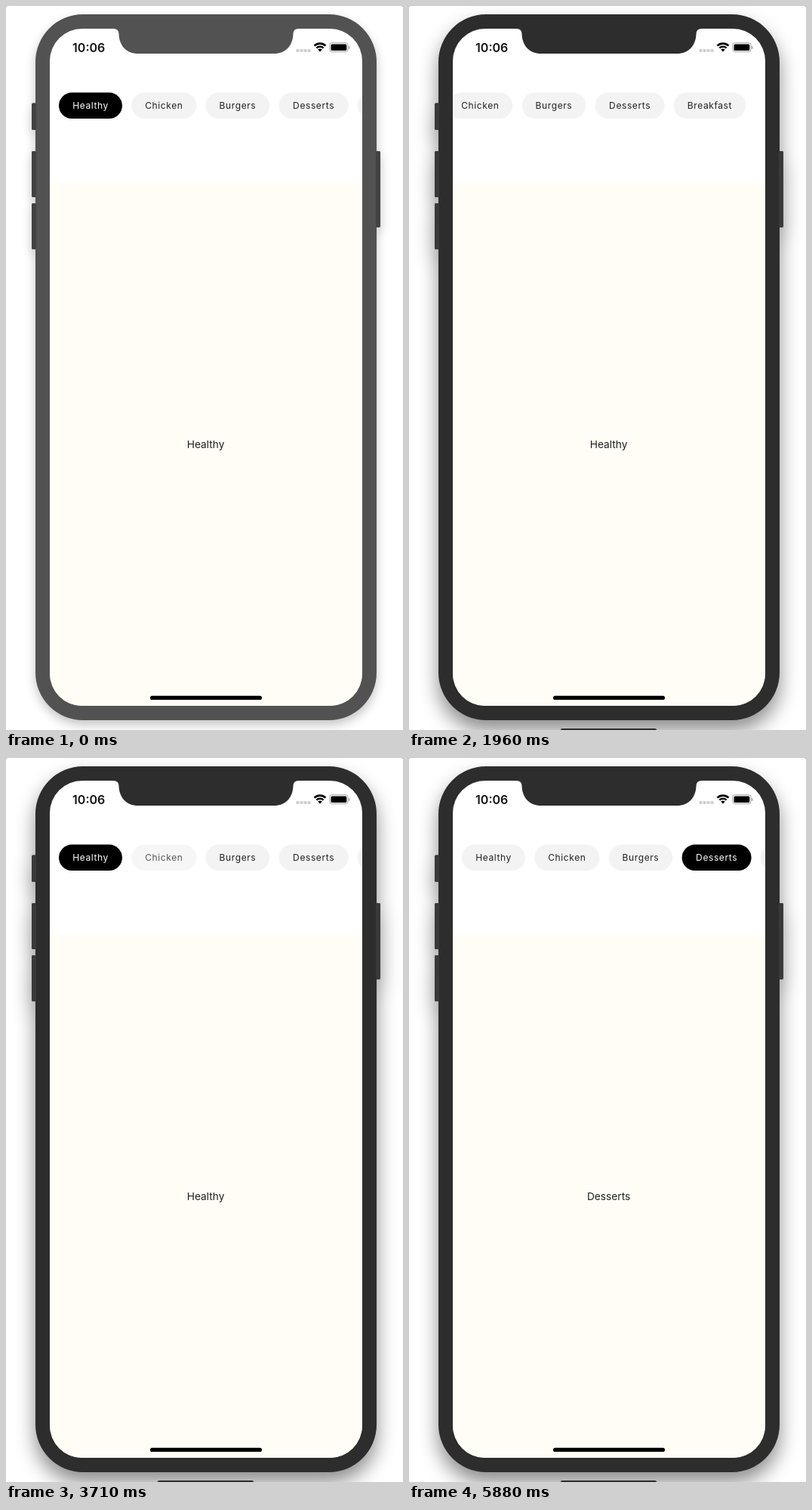
Animation of 526 by 958 pixels, one loop 6.65 s. Source, as an HTML page with a canvas:

```html
<!DOCTYPE html>
<html lang="en">
<head>
<meta charset="utf-8">
<title>Category tabs</title>
<style>
html, body { margin: 0; width: 100%; height: 100%; overflow: hidden; background: #fff; }
canvas { display: block; width: 526px; height: 958px; }
</style>
</head>
<body>
<canvas id="stage" width="526" height="958"></canvas>
<script>
const ctx = document.getElementById('stage').getContext('2d');
const LOOP = 6650, STEP = 70;
const FOCUS_AT = 1400, BAR_AT = 840;
const PRESSED = 0.75, FADE = 210;
const INK = '#202020';

const tabs = [
  { label: 'Healthy', x: 70, w: 84 },
  { label: 'Chicken', x: 166.3, w: 86 },
  { label: 'Burgers', x: 264.7, w: 84.5 },
  { label: 'Desserts', x: 361.6, w: 92 },
  { label: 'Breakfast', x: 465.7, w: 95.5 }
];

const presses = [
  { tab: 3, down: 1470, up: 1540, selects: false },
  { tab: 1, down: 3710, up: 3850, selects: true },
  { tab: 2, down: 4550, up: 4760, selects: true },
  { tab: 3, down: 5530, up: 5670, selects: true }
];

// Drag positions of the tab row as [time, offset]
const drag = [
  [1470, 0], [1540, -4], [1680, -42], [1820, -88], [1960, -115], [2100, -123],
  [2240, -110], [2380, -101], [2450, -95.5], [2590, -42], [2730, 8],
  [2870, 37], [2940, 36], [3080, 21]
];

function scrollAt(t) {
  if (t <= drag[0][0] || t >= 3570) return 0;
  if (t >= 3080) return 21 * Math.exp(-(t - 3080) / 150);
  const i = drag.findIndex(p => p[0] > t);
  const [t0, a] = drag[i - 1], [t1, b] = drag[i];
  return a + (b - a) * (t - t0) / (t1 - t0);
}

function opacityAt(tab, t) {
  let alpha = 1;
  for (const p of presses) {
    if (p.tab !== tab || t < p.down) continue;
    const back = Math.min(1, Math.max(0, (t - p.up) / FADE));
    alpha = PRESSED + (1 - PRESSED) * back;
  }
  return alpha;
}

function selectedAt(t) {
  return presses.reduce((tab, p) => p.selects && t >= p.up ? p.tab : tab, 0);
}

function box(x, y, w, h, r, color) {
  ctx.beginPath();
  ctx.roundRect(x, y, w, h, r);
  ctx.fillStyle = color;
  ctx.fill();
}

function text(str, x, y, font, color, spacing = 0) {
  ctx.font = font + ' Inter, sans-serif';
  ctx.letterSpacing = spacing + 'px';
  ctx.textAlign = 'center';
  ctx.textBaseline = 'alphabetic';
  ctx.fillStyle = color;
  ctx.fillText(str, x, y);
}

const buttons = [[34, 128.5, 6, 35.5], [34, 192, 6, 61], [34, 261, 6, 61], [490, 192, 6, 101]];

function drawBody(focused) {
  ctx.save();
  ctx.shadowColor = `rgba(0,0,0,${focused ? 0.45 : 0.24})`;
  ctx.shadowBlur = focused ? 26 : 14;
  ctx.shadowOffsetY = focused ? 14 : 6;
  ctx.beginPath();
  ctx.roundRect(39, 11, 452, 934, 63);
  for (const b of buttons) ctx.roundRect(...b, 2);
  ctx.fillStyle = focused ? '#2d2d2d' : '#525252';
  ctx.fill();
  ctx.restore();
  for (const b of buttons) box(...b, 2, focused ? '#393939' : '#424242');
}

function drawNotch(color) {
  ctx.beginPath();
  ctx.moveTo(142, 29);
  ctx.lineTo(142, 30);
  ctx.quadraticCurveTo(149.5, 30, 149.5, 37);
  ctx.bezierCurveTo(150, 53, 160, 63, 175, 63);
  ctx.lineTo(355, 63);
  ctx.bezierCurveTo(370, 63, 380, 53, 380.5, 37);
  ctx.quadraticCurveTo(380.5, 30, 388, 30);
  ctx.lineTo(388, 29);
  ctx.fillStyle = color;
  ctx.fill();
}

function drawWifi() {
  const cx = 416, cy = 60.5, half = 0.76, up = -Math.PI / 2;
  for (const [outer, inner] of [[12.2, 9.5], [8, 5.4], [3.9, 0]]) {
    ctx.beginPath();
    ctx.arc(cx, cy, outer, up - half, up + half);
    ctx.arc(cx, cy, inner, up + half, up - half, true);
    ctx.fillStyle = '#000';
    ctx.fill();
  }
}

function drawStatus() {
  text('10:06', 109.7, 60.8, '600 16px', '#111');
  for (let i = 0; i < 4; i++) box(384.5 + i * 5, 57, 4, 4, 1.2, '#cfcfcf');
  drawWifi();
  ctx.beginPath();
  ctx.roundRect(428.8, 48.8, 24.2, 11.8, 3);
  ctx.strokeStyle = '#a3a3a3';
  ctx.lineWidth = 1;
  ctx.stroke();
  box(430.5, 50.4, 20.8, 8.6, 1.6, '#000');
  box(454, 53, 1.4, 4, [0, 1.4, 1.4, 0], '#a3a3a3');
}

function drawTabs(t) {
  const shift = scrollAt(t), selected = selectedAt(t);
  tabs.forEach(({ label, x, w }, i) => {
    const on = i === selected;
    ctx.globalAlpha = opacityAt(i, t);
    box(x + shift, 114.6, w, 34.4, 17.2, on ? '#000' : '#f3f3f3');
    text(label, x + shift + w / 2, 136.2, '400 12px', on ? '#fff' : INK, 0.6);
  });
  ctx.globalAlpha = 1;
}

function draw(t) {
  const focused = t >= FOCUS_AT;
  ctx.fillStyle = '#fff';
  ctx.fillRect(0, 0, 526, 958);
  drawBody(focused);

  ctx.save();
  ctx.beginPath();
  ctx.roundRect(58, 30, 414, 896, 43);
  ctx.fillStyle = '#fff';
  ctx.fill();
  ctx.clip();
  ctx.fillStyle = '#fffdf5';
  ctx.fillRect(58, 234, 414, 692);
  drawStatus();
  drawTabs(t);
  text(tabs[selectedAt(t)].label, 264.6, 584.7, '400 13.7px', INK);
  box(191, 912.8, 148, 5.2, 2.6, '#000');
  ctx.restore();

  drawNotch(focused ? '#2d2d2d' : '#525252');
  if (t >= BAR_AT) box(200.5, 956, 128, 8, 3, '#2d2d2d');
  ctx.fillStyle = '#999';
  ctx.fillRect(0, 0, 1, 1);
  ctx.fillRect(525, 0, 1, 1);
}

const start = performance.now();
function frame() {
  const t = (performance.now() - start) % LOOP;
  draw(Math.floor(t / STEP) * STEP);
  requestAnimationFrame(frame);
}
frame();
</script>
</body>
</html>
```
